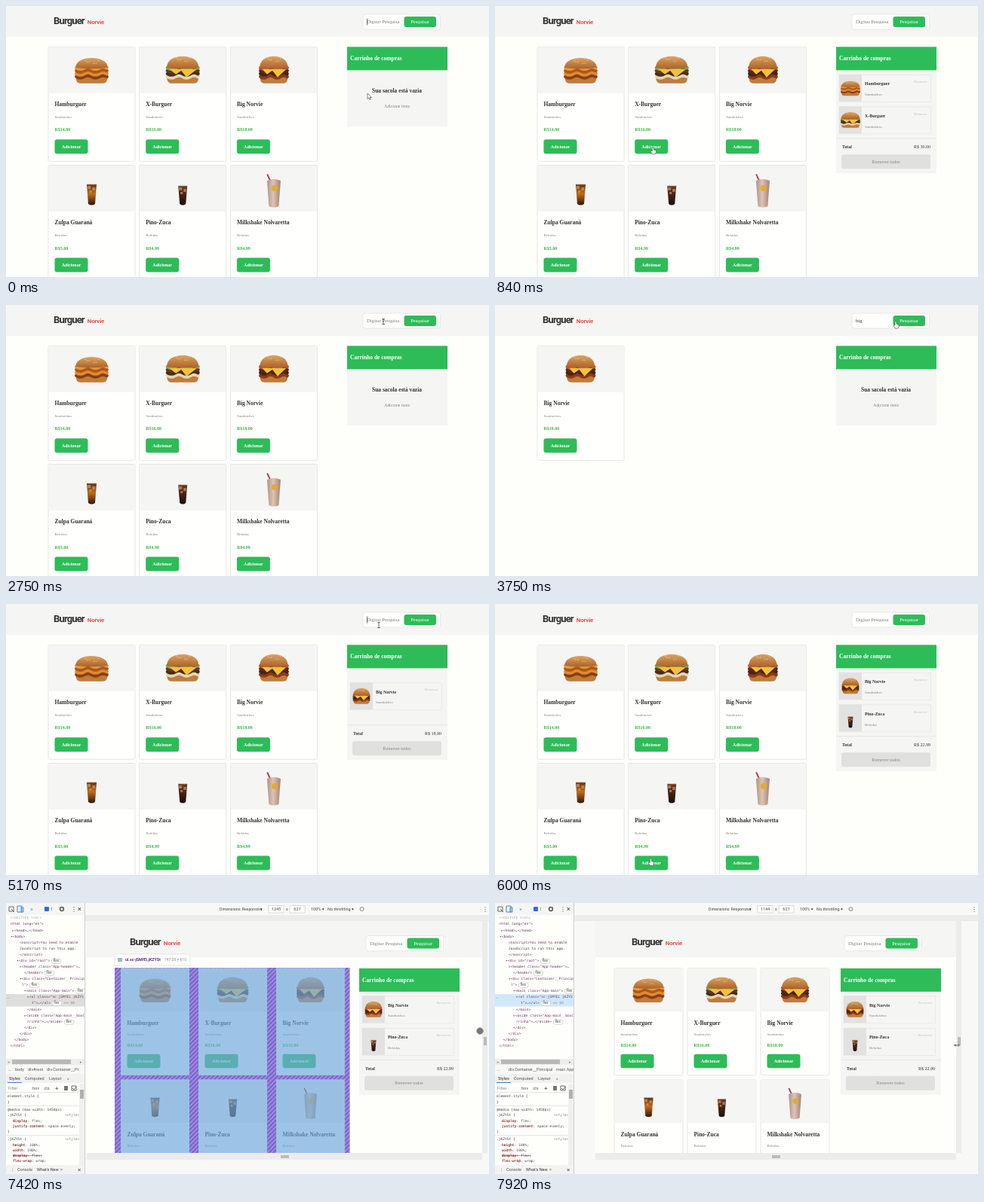
Recreate the animation shown at these times as an HTML page. Size 640 px wide and 360 px high, loop 8 s.

```html
<!DOCTYPE html>
<html lang="pt">
<head>
<meta charset="utf-8">
<title>Burguer Norvie</title>
<style>
html, body { margin: 0; width: 100%; height: 100%; overflow: hidden; background: #fefefb; }
svg { display: block; width: 100vw; height: 100vh; }
text { white-space: pre; }
.serif { font-family: "Liberation Serif", serif; }
.sans { font-family: Roboto, sans-serif; }
.mono { font-family: "DejaVu Sans Mono", monospace; }
</style>
</head>
<body>
<svg viewBox="0 0 640 360">
  <defs>
    <pattern id="hatch" width="4" height="4" patternUnits="userSpaceOnUse" patternTransform="rotate(45)">
      <rect width="4" height="4" fill="#a08cda"/><rect width="2" height="4" fill="#7a62d0"/>
    </pattern>
    <linearGradient id="bun" x2="0" y2="1"><stop stop-color="#dda360"/><stop offset="1" stop-color="#ab622a"/></linearGradient>
    <linearGradient id="amber" x2="0" y2="1"><stop stop-color="#64330f"/><stop offset=".45" stop-color="#bd6c1c"/><stop offset="1" stop-color="#311609"/></linearGradient>
    <linearGradient id="cola" x2="0" y2="1"><stop stop-color="#6b3722"/><stop offset="1" stop-color="#1c0d0a"/></linearGradient>
    <linearGradient id="shake"><stop stop-color="#b39385"/><stop offset=".45" stop-color="#dcc5b6"/><stop offset="1" stop-color="#a58273"/></linearGradient>
    <clipPath id="view"><rect x="105" y="24" width="535" height="308"/></clipPath>
    <clipPath id="panel"><rect width="104" height="360"/></clipPath>
  </defs>
  <g id="scene"></g>
  <g id="pointer"></g>
</svg>
<script>
const LOOP = 8000, GREEN = '#2dbc58', PAGE = '#fefefb', PALE = '#f5f5f3', INK = '#333', GRAY = '#858585';
const scene = document.getElementById('scene'), pointer = document.getElementById('pointer');

const lerp = (a, b, q) => a + (b - a) * q;
const clamp = v => Math.max(0, Math.min(1, v));
const rect = (x, y, w, h, fill, more = '') =>
  `<rect x="${x}" y="${y}" width="${w}" height="${h}" fill="${fill}" ${more}/>`;
const path = (d, fill, more = '') => `<path d="${d}" fill="${fill}" ${more}/>`;
const esc = s => s.replace(/&/g, '&amp;').replace(/</g, '&lt;');
// y is the middle of the capitals
const text = (x, y, s, size, fill = INK, more = '', font = 'serif') =>
  `<text class="${font}" x="${x}" y="${y + size * .32}" font-size="${size}" fill="${fill}" ${more}>${esc(s)}</text>`;
const bold = (x, y, s, size, fill, more = '') => text(x, y, s, size, fill, 'font-weight="700" ' + more);
const MID = 'text-anchor="middle"', END = 'text-anchor="end"';

// Food, centred on 0,0
const wave = (w, y, color) =>
  path(`M${-w},${y}q${w / 4},3 ${w / 2},0t${w / 2},0t${w / 2},0t${w / 2},0`, 'none',
    `stroke="${color}" stroke-width="4.8" stroke-linecap="round"`);
const burger = (w, top, layers, cheese) =>
  path(`M${-w + 2},9H${w - 2}Q${w - 2},18 ${w - 8},18H${8 - w}Q${2 - w},18 ${2 - w},9Z`, '#c07c3c') +
  layers.map((c, i) => wave(w - 3, 9 - i * 3.9, c)).join('') +
  (cheese ? path(`M${-w + 5},-1L-9,6L-2,1L5,10L${w - 4},-1Z`, '#f2c13c') : '') +
  path(`M${2 - w},-3C${1 - w},${top - 4} ${w - 1},${top - 4} ${w - 2},-3Q0,0 ${2 - w},-3Z`, 'url(#bun)') +
  [-9, -4, 2, 8, -7, 5].map((x, i) => rect(x, top + 3 + i % 3 * 2, 1.6, .8, '#f0d5a0')).join('');
const glass = (w, y, fill) =>
  path(`M${-w},${y}H${w}L${w - 2},21Q0,24 ${2 - w},21Z`, `url(#${fill})`) +
  path(`M${1 - w},${y + 2}h4v4h-4zM1,${y + 4}h3.5v4h-3.5zM-3,${y + 8}h3v3h-3z`, '#dca873', 'opacity=".6"') +
  path(`M${-w},${y}H${w}`, 'none', 'stroke="#a39890" stroke-width=".8"');
const FOOD = [
  burger(23, -16, ['#8a3f18', '#de8c2e', '#b2561c', '#e09a38'], false),
  burger(23, -19, ['#e2d8b8', '#4a2c1e', '#5f3a24', '#84a044'], true),
  burger(20.5, -19, ['#8c3a1a', '#4a2413', '#54291a', '#c2502a'], true),
  glass(6.5, -5, 'amber'),
  glass(6, -3, 'cola'),
  path('M-9.5,-18L-8,-19L-3,-8H-5Z', '#b82a3a') +
  path('M-9,-10Q0,-14 9,-10L6.5,24Q0,27 -6.5,24Z', 'url(#shake)') +
  '<circle cx="1" cy="0" r="4" fill="#e3aa35"/>'
];

const ITEMS = [
  ['Hamburguer', 'Sanduíches', '14.00'],
  ['X-Burguer', 'Sanduíches', '16.00'],
  ['Big Norvie', 'Sanduíches', '18.00'],
  ['Zulpa Guaraná', 'Bebidas', '5.00'],
  ['Pino-Zuca', 'Bebidas', '4.99'],
  ['Milkshake Nolvaretta', 'Bebidas', '4.99']
];

const FULL = {
  dy: 0, left: 0, right: 640, logo: 63, search: 473, cart: 452, gx: 56, px: 120.7, py: 157.2, w: 115, h: 152,
  img: 61, rows: [76.5, 93.2, 110.2, 123], btn: 19
};
const framed = q => ({
  dy: 32.5, left: lerp(107, 133, q), right: lerp(631, 611, q), logo: lerp(164, 181, q),
  search: lerp(477, 463, q), cart: lerp(468, 458, q), gx: lerp(152, 158, q), px: lerp(103, 97, q), py: 148,
  w: 91, h: 142, img: 57, rows: [73, 88, 102.5, 114], btn: 18.5
});

function card(id, x, y, L) {
  const [name, kind, price] = ITEMS[id], [a, b, c, d] = L.rows, k = L.img / 61;
  return rect(x, y, L.w, L.h, '#fffffd', 'stroke="#e6e6e4" rx="1.5"') +
    rect(x + .5, y + .5, L.w - 1, L.img, PALE) +
    `<g transform="translate(${x + L.w / 2} ${y + L.img / 2}) scale(${k})">${FOOD[id]}</g>` +
    bold(x + 8.5, y + a, name, 7.5) + text(x + 8.5, y + b, kind, 5, GRAY) +
    bold(x + 8.5, y + c, 'R$' + price, 6, '#35b842') +
    rect(x + 8.5, y + d, 44, L.btn, GREEN, 'rx="3"') +
    bold(x + 30.5, y + d + L.btn / 2, 'Adicionar', 6, '#fff', MID);
}

function cartItem(id, x, y) {
  const [name, kind] = ITEMS[id], lines = id === 5 ? name.split(' ') : [name], two = lines.length > 1;
  return rect(x + 4, y, 121.5, 36, 'none', 'stroke="#e8e8e6" stroke-width=".8"') +
    rect(x + 4, y - .5, 30, 36, '#e2e2e1') +
    `<g transform="translate(${x + 19} ${y + 17.5}) scale(.58)">${FOOD[id]}</g>` +
    lines.map((s, i) => bold(x + 38, y + (two ? 6 + 11 * i : 12), s, 5.9)).join('') +
    text(x + 38, y + (two ? 28 : 26), kind, 5, GRAY) +
    text(x + 121, y + 9, 'Remover', 5, '#c4c4c4', END);
}

function cartBox(ids, total, x, y) {
  const n = ids.length, sep = n > 1 ? 35 + 43 * n : 106;
  let out = rect(x, y, 133, n ? sep + 47 : 106, PALE) +
    rect(x, y, 133, 31, GREEN) + bold(x + 4, y + 15.5, 'Carrinho de compras', 7.5, '#fff');
  if (!n) return out + bold(x + 66, y + 58, 'Sua sacola está vazia', 7.45, INK, MID) +
    text(x + 66, y + 79, 'Adicione itens', 5.9, GRAY, MID);
  out += ids.map((id, i) => cartItem(id, x, y + (n > 1 ? 37 + 42.6 * i : 50.5))).join('');
  return out + rect(x, y + sep, 133, 1, '#e6e6e4') +
    bold(x + 8, y + sep + 12, 'Total', 5.9) + text(x + 125, y + sep + 12, 'R$ ' + total, 6, INK, END) +
    rect(x + 7, y + sep + 22, 118, 19, '#e0e0df', 'rx="3"') +
    text(x + 66, y + sep + 31.5, 'Remover todos', 6.15, GRAY, MID);
}

function page(s, L) {
  const top = L.dy ? 24 : 0, y = L.dy, sx = L.search;
  const logo = (x, ty, t, size, fill, sp) =>
    text(x, ty, t, size, fill, `font-weight="700" letter-spacing="${sp}"`, 'sans');
  let out = rect(L.left, top, L.right - L.left, 340, PAGE) +
    rect(L.left, top, L.right - L.left, 41 + y - top - (y ? 1.5 : 0), PALE) +
    logo(L.logo, y + 19.6, 'Burguer', 13, '#333', -.85) +
    logo(L.logo + 44.8, y + 21, 'Norvie', 7.9, '#e8504e', -.15) +
    rect(sx, y + 11, 102.5, 20, '#fffffd', 'rx="3" stroke="#e9e9e7"') +
    text(sx + 5, y + 21.3, s.query || 'Digitar Pesquisa', 6.6, s.query ? INK : '#7c7c7c') +
    rect(sx + 54.5, y + 14, 42.5, 14, GREEN, 'rx="3"') +
    text(sx + 75.7, y + 21, 'Pesquisar', 6.5, '#fff', MID);
  if (s.caret) out += rect(sx + 5 + s.query.length * 3.2, y + 16.5, .7, 9, INK);
  s.shown.forEach((id, i) => {
    out += card(id, L.gx + i % 3 * L.px, 54.3 + y + (i / 3 | 0) * L.py, L);
  });
  return out + cartBox(s.cart, s.total, L.cart, 54.3 + y);
}

const CODE = [
  [5.5, 20, '<!DOCTYPE html>'], [5.5, 28, '<html lang="en">'], [8, 36.5, '▸<head>…</head>'], [6, 44.5, '▾<body>'],
  [18, 53, '<noscript>You need to enable'], [18, 61, 'JavaScript to run this app.'], [18, 69, '</noscript>'],
  [14, 77, '▾<div id="root">', 1], [18, 85, '▸<header class="App-header">…'], [24, 93, '</header>', 1],
  [18, 101, '▾<div class="Container__Principa'], [21, 109, 'l">', 1], [24, 117, '▾<main class="App-main">', 1],
  [28, 125, '▸<ul class="sc-jSMfEi jKZYS'], [34, 133, 't">…</ul>', 1], [28, 142, '</main>'],
  [24, 150, '▸<aside class="App-main__boxCa'], [28, 158, 'rrinho">…</aside>', 1],
  [24, 166, '</div>'], [18, 174, '</div>'], [11, 182, '</body>'], [5.5, 190, '</html>']
];
const RULES = [
  [2, 257, 'element.style {'], [2, 265, '}'], [2, 275, '@media (max-width: 1450px)'], [2, 282, '.jKZYSt {'],
  [9, 290, 'display: flex;'], [9, 297, 'justify-content: space-evenly;'], [2, 304, '}'], [2, 314, '.jKZYSt {'],
  [9, 321.5, 'height: 100%;'], [9, 328.5, 'width: 100%;'], [9, 335.5, 'display: flex;', 1], [9, 342.5, 'flex-wrap: wrap;']
];
const mono = (x, y, s, fill, more) => text(x, y, s, 4.6, fill, more, 'mono');
const ui = (x, y, s, fill = '#555', size = 5.5, more = '') => text(x, y, s, size, fill, more, 'sans');
const tag = s => s.includes('<') || s.endsWith('">') ? '#6d3565' : '#444';

function inspector(crumb, lit) {
  let out = rect(0, 0, 105, 360, PAGE) + rect(0, 0, 105, 16, PALE) +
    path('M4,5h6v6h-6zM7,8l4,4', 'none', 'stroke="#666"') +
    path('M15,4h6v8h-6zM20,6h3v6h-3z', 'none', 'stroke="#3f86d4"') +
    ui(32, 8, '»', '#3f86d4', 8) + rect(51, 5, 6, 6, '#2d6fd0', 'rx="1"') + ui(59, 8, '1') +
    '<circle cx="74" cy="8" r="2.4" fill="none" stroke="#555" stroke-width="1.5"/>' +
    ui(86, 8, '⋮', '#444', 8) + ui(95, 8, '×', '#444', 9) +
    rect(0, 121, 104, 16.5, lit ? '#dededd' : '#d0e8fb') + ui(1, 125, '…');
  CODE.forEach(([x, y, s, flex]) => {
    out += mono(x, y, s, y === 20 ? '#aaa' : tag(s));
    if (!flex) return;
    const e = x + s.length * 2.77 + 2;
    out += rect(e, y - 3, 13, 6.4, '#fafaf8', 'rx="3" stroke="#bbb" stroke-width=".5"') + ui(e + 2.4, y, 'flex', '#555', 4.5);
    if (y === 133) out += mono(e + 16, y, '== $0', GRAY);
  });
  out += rect(0, 207, 104, 8, '#ededeb') + rect(8, 208, 78, 6, '#b9b9b8') +
    ui(2, 211, '◂', GRAY, 5) + ui(98, 211, '▸', GRAY, 5) +
    rect(0, 215, 105, 12, '#f8f8f7') + crumb.map(([x, s]) => ui(x, 221, s)).join('') +
    rect(0, 227, 105, 12, '#f1f1f0') + ui(4, 233, 'Styles', INK) + ui(25, 233, 'Computed') +
    ui(57, 233, 'Layout') + ui(81, 233, '»') + rect(2, 238, 19, 1, '#3d7cd2') +
    ui(3, 246, 'Filter', GRAY) + ui(34, 246, ':hov') + ui(49, 246, '.cls') + ui(65, 246, '+', '#444', 8) +
    rect(77, 243, 5, 6, '#777') + path('M87,243h6v6h-6zM88,246l2,2l3,-4', 'none', 'stroke="#666"') +
    [251, 269, 308].map(y => rect(0, y, 97, .7, '#dcdcdb')).join('');
  RULES.forEach(([x, y, s, cut]) => {
    const line = cut ? 'text-decoration="line-through"' : '';
    out += mono(x, y, s, '#444', line);
    if (x === 9) out += mono(x, y, s.split(':')[0], '#c0453c', line);
  });
  out += mono(78, 282, '<style>', GRAY) + mono(78, 314, '<style>', GRAY) +
    rect(97, 240, 7, 108, '#f0f0ef') + rect(98, 248, 5, 12, '#b0b0af') +
    rect(0, 348, 105, 12, '#f3f3f2') + ui(6, 354, '⋮') + ui(15, 354, 'Console') +
    ui(41, 354, "What's New", INK) + ui(72, 354, '×') + ui(95, 354, '×', '#444', 8);
  return `<g clip-path="url(#panel)">${out}</g>` + rect(104, 0, 1, 360, '#cfcfce');
}

function overlay(L) {
  const boxes = [0, 1, 2, 3, 4, 5].map(i => {
    const row = i / 3 | 0;
    return `M${L.gx + i % 3 * L.px},${row ? 234.5 : 86.5}h${L.w}v${row ? 98 : 142.5}h${-L.w}z`;
  }).join('');
  return path(boxes, '#6fa8dc', 'opacity=".68"') +
    path(`M144,86H455.5V332H144Z${boxes}`, 'url(#hatch)', 'fill-rule="evenodd"') +
    path('M144,68H244V83H159L155,87L151,83H144Z', '#fffffd', 'stroke="#d8d8d7" stroke-width=".6"') +
    rect(148, 73, 6, 5, '#9cb4d8') +
    ui(158, 75.7, 'ul.sc-jSMfEi.jKZYSt', '#5e2a82', 5.3, 'font-weight="700"') +
    ui(210, 75.7, '747.25 × 610', GRAY, 5);
}

function devtools(s, t) {
  const q = clamp((t - 7480) / 420), L = framed(q), lit = t >= 7170 && t < 7500;
  const mid = (L.left + L.right) / 2, grip = '#8c8c8b';
  let out = rect(105, 0, 535, 360, '#f8f8f7') + rect(105, 16, 535, 8, '#ececeb') +
    rect(105, 24, 535, 308, '#f8f8f7') +
    `<g clip-path="url(#view)">${page(s, L)}${lit ? overlay(L) : ''}</g>` +
    rect(L.right, 24, 7, 308, '#ececeb') + rect(L.right + 2.5, 178, 1, 11, grip) + rect(L.right + 4.5, 178, 1, 11, grip) +
    rect(L.left, 332, L.right - L.left, 9, '#ececeb') + rect(mid - 5, 335.5, 11, 1, grip) + rect(mid - 5, 337.5, 11, 1, grip) +
    ui(283, 8, 'Dimensions: Responsive', '#444', 5.2) + ui(337, 8, '▾', '#444', 5.2);
  [[348, Math.round(lerp(1245, 1144, q))], [376, 627]].forEach(([x, n]) => {
    out += rect(x, 3.5, 20, 9.5, '#fffffd', 'stroke="#cdcdcc" stroke-width=".7"') + ui(x + 10, 8.2, String(n), '#444', 5.5, MID);
  });
  out += ui(371, 8, 'x') + ui(404, 8, '100% ▾', '#444') + ui(426, 8, 'No throttling ▾', '#444') +
    '<circle cx="471.5" cy="8" r="2.5" fill="none" stroke="#777" stroke-width=".9"/>' + ui(631, 8, '⋮', '#444', 8);
  return out + inspector(q < .3
    ? [[3, '…'], [12, 'body'], [29, 'div#root'], [54, 'div.Container__Pr']]
    : [[3, '…'], [18, 'div.Container__Principal'], [81, 'main.App']], t < 7500);
}

// Shop state: the last entry reached counts
const at = (list, t) => list.reduce((v, [from, val]) => t >= from ? val : v, list[0][1]);
const CARTS = [[0, [[], '']], [430, [[0], '14.00']], [760, [[0, 1], '30.00']], [1230, [[0, 1, 5], '39,98']],
  [2220, [[], '']], [4230, [[2], '18.00']], [5900, [[2, 4], '22.99']]];
const QUERIES = [[0, ''], [2850, 'b'], [3000, 'bi'], [3150, 'big'], [4920, '']];
const FOCUS = [[0, true], [430, false], [2680, true], [3580, false], [4780, true], [5900, false]];
const ALL = [0, 1, 2, 3, 4, 5];

function state(t) {
  const [cart, total] = at(CARTS, t);
  return {
    cart, total, query: at(QUERIES, t),
    shown: t >= 3580 && t < 5000 ? [2] : ALL,
    caret: at(FOCUS, t) && (t < 2500 ? t % 1000 < 500 : (t + 100) % 1000 < 600)
  };
}

const MOVES = [[0, 479, 116], [380, 90, 186], [480, 90, 186], [710, 208, 186], [820, 208, 186], [1160, 326, 342],
  [1290, 326, 342], [1750, 489, 158], [2120, 530, 247], [2280, 530, 247], [2650, 500, 22], [3250, 500, 22],
  [3520, 540, 21], [3750, 531, 22], [4140, 92, 186], [4280, 92, 186], [4730, 494, 22], [5170, 494, 28],
  [5750, 208, 342], [5950, 208, 342], [6500, 140, 200], [6920, 128, 160], [7050, 128, 160], [7420, 628, 170],
  [7500, 634, 183], [7900, 612, 189], [8000, 612, 189]];

function place(t) {
  const i = MOVES.findIndex(m => m[0] > t), [t0, x0, y0] = MOVES[i - 1], [t1, x1, y1] = MOVES[i];
  const p = (t - t0) / (t1 - t0), q = p * p * (3 - 2 * p);
  return [lerp(x0, x1, q), lerp(y0, y1, q)];
}

function shape(t, x, y, s) {
  if (t >= 7500) return 'size';
  if (t >= 7100) return 'touch';
  const inside = (l, u, w, h) => x > l && x < l + w && y > u && y < u + h;
  if (inside(527, 14, 43, 14)) return 'hand';
  if (inside(473, 11, 54, 20)) return 'beam';
  const onCard = s.shown.some((id, i) => inside(64 + i % 3 * 120.7, 177 + (i / 3 | 0) * 157, 44, 19));
  return onCard || (s.cart.length === 3 && inside(459, 240, 118, 19)) ? 'hand' : 'arrow';
}

const EDGE = 'stroke="#555" stroke-width=".7"';
const POINTERS = {
  arrow: path('M0,0V7.5L1.8,5.9L3,8.6L4.2,8L3,5.5H5.3Z', '#fff', EDGE),
  hand: path('M-1,0Q0,-1 1,0V3L4,4Q4.6,7 3,9H-1L-3,5.5Q-3,4 -1,5Z', '#fff', EDGE),
  beam: path('M-1.8,-3.5H1.8M0,-3.5V3.5M-1.8,3.5H1.8', 'none', 'stroke="#444" stroke-width=".8"'),
  size: path('M-4,0L-1.5,-2V2ZM4,0L1.5,-2V2ZM-2,-.4H2V.4H-2Z', '#667'),
  touch: '<circle r="4.4" fill="#777" stroke="#aaa"/>'
};

let last = '';
function draw(t) {
  const s = state(t), [x, y] = place(t);
  const html = t < 7050 ? page(s, FULL) : devtools(s, t);
  if (html !== last) scene.innerHTML = last = html;
  pointer.innerHTML = POINTERS[shape(t, x, y, s)];
  pointer.setAttribute('transform', `translate(${x} ${y})`);
}

const start = performance.now();
function tick() {
  draw((performance.now() - start) % LOOP);
  requestAnimationFrame(tick);
}
tick();
</script>
</body>
</html>
```
